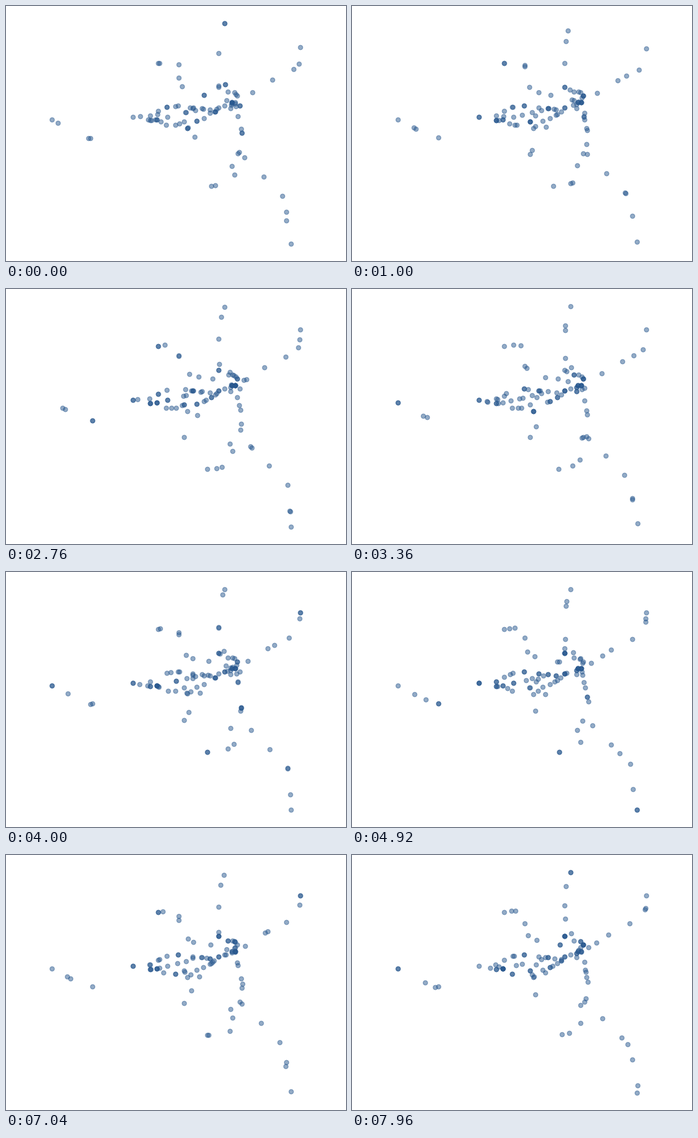
Write a matplotlib script that moves like this. It is 512 px wide and 384 px high and loops after 8 s.

```python
import random

import numpy as np
import matplotlib.pyplot as plt
from matplotlib.animation import FuncAnimation

W, H, DPI = 512, 384, 80
FRAMES, INTERVAL = 200, 40
LOOP = FRAMES * INTERVAL / 1000
COLOR = "#28588f"
SPEED = 34      # pixels per second
STOP = 0.6      # pause at each inner station, seconds

random.seed(11)


class Track:
    def __init__(self, *points):
        self.x, self.y = np.array(points, float).T
        steps = np.hypot(np.diff(self.x), np.diff(self.y))
        self.dist = np.concatenate([[0], np.cumsum(steps)])
        self.length = self.dist[-1]

    def at(self, s):
        return np.interp(s, self.dist, self.x), np.interp(s, self.dist, self.y)


class Branch:
    """Outer line with a regular service each way.
    `out` and `back` are (first, gap): when trains leave and reach the tip."""

    def __init__(self, track, out, back, wait=0.9, speed=SPEED):
        self.track, self.wait, self.speed = track, wait, speed
        run = track.length / speed
        leave = np.arange(out[0], LOOP + wait, out[1])
        reach = np.arange(back[0], LOOP + run + wait, back[1])
        self.trips = [(t, t + run, 1) for t in leave]
        self.trips += [(t - run, t, -1) for t in reach]

    def places(self, t):
        for start, end, way in self.trips:
            if start - self.wait <= t <= end + self.wait:
                s = (t - start if way > 0 else end - t) * self.speed
                yield self.track.at(np.clip(s, 0, self.track.length))


class Shuttle:
    """Inner line: evenly spread trains run to and fro, pausing at stations."""

    def __init__(self, track, count):
        self.track = track
        arrive = track.dist / SPEED + STOP * np.arange(len(track.dist))
        self.times = np.column_stack([arrive, arrive + STOP]).ravel()
        self.marks = np.repeat(track.dist, 2)
        self.total = self.times[-1]
        self.clocks = [2 * self.total * (k + random.random()) / count
                       for k in range(count)]

    def places(self, t):
        for clock in self.clocks:
            u = (clock + t) % (2 * self.total)
            u = min(u, 2 * self.total - u)
            yield self.track.at(np.interp(u, self.times, self.marks))


west = Track((69, 171), (81, 177), (96, 185), (124, 199), (130, 198))
north = Track((329, 26), (322, 47), (320, 78), (321, 108), (320, 122))
northwest = Track((229, 86), (240, 84), (250, 84), (260, 87), (260, 117),
                  (271, 125), (283, 131), (298, 134), (315, 135), (340, 145))
northeast = Track((443, 61), (441, 87), (435, 94), (424, 100), (388, 118),
                  (368, 132), (345, 145))
southeast = Track((429, 358), (431, 341), (421, 322), (424, 293), (414, 284),
                  (376, 245), (351, 220), (356, 195), (349, 166), (345, 145))
south = Track((303, 271), (312, 271), (342, 264), (344, 254), (337, 233),
              (351, 220), (356, 195), (349, 166), (345, 145))
inlet = Track((268, 223), (284, 196), (292, 182), (290, 172), (298, 169))

upper = Track((191, 167), (217, 172), (227, 171), (229, 158), (242, 152),
              (259, 150), (281, 153), (295, 154), (307, 156), (315, 159),
              (320, 153), (329, 150), (338, 148), (340, 145), (348, 135))
lower = Track((217, 172), (227, 171), (241, 179), (255, 179), (268, 174),
              (273, 184), (287, 173), (298, 169), (309, 163), (320, 153))
middle = Track((191, 167), (217, 165), (227, 171), (243, 167), (256, 164),
               (271, 160), (285, 157), (295, 154), (309, 163))
cross = Track((273, 184), (268, 174), (281, 160), (281, 153))
hub = Track((320, 122), (334, 129), (344, 130), (348, 135), (340, 145),
            (338, 154))
east = Track((320, 122), (330, 118), (341, 129), (348, 135), (345, 145),
             (352, 150), (349, 166))

lines = [
    Branch(west, out=(-1.9, 2.0), back=(0.3, 1.5)),
    Branch(north, out=(0.16, 2.1), back=(-0.1, 1.45)),
    Branch(northwest, out=(-3.05, 1.5), back=(-0.1, 1.05)),
    Branch(northeast, out=(-0.76, 2.7), back=(0.03, 1.06)),
    Branch(southeast, out=(-5.03, 3.55), back=(-0.1, 1.2)),
    Branch(south, out=(-5.05, 2.4), back=(0.5, 1.6), speed=24),
    Branch(inlet, out=(0.8, 2.8), back=(-0.6, 1.5), wait=0.5),
    Shuttle(upper, 22),
    Shuttle(lower, 12),
    Shuttle(middle, 9),
    Shuttle(cross, 3),
    Shuttle(hub, 7),
    Shuttle(east, 5),
]

fig = plt.figure(figsize=(W / DPI, H / DPI), dpi=DPI, facecolor="white")
ax = fig.add_axes([0, 0, 1, 1])
ax.set_xlim(0, W)
ax.set_ylim(H, 0)
ax.axis("off")
dots = ax.scatter([], [], s=36, c=COLOR, alpha=0.5)


def draw(i):
    t = i * INTERVAL / 1000
    dots.set_offsets([spot for line in lines for spot in line.places(t)])
    return dots,


anim = FuncAnimation(fig, draw, frames=FRAMES, interval=INTERVAL,
                     init_func=lambda: draw(0), repeat=True, repeat_delay=0)
plt.show()
```
